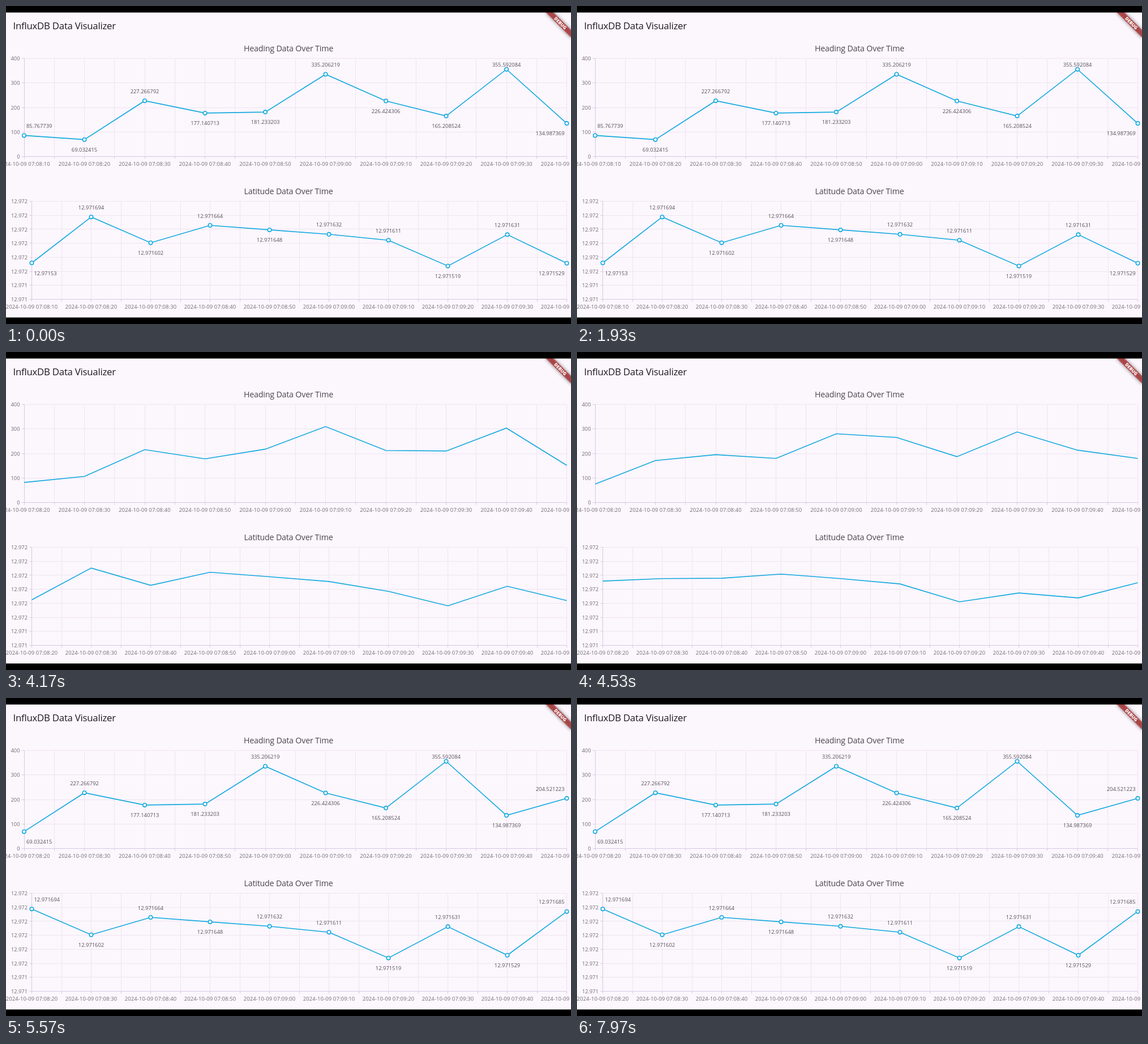
An HTML page with a canvas that plays this animation: 998x561 px, repeating every 8 s.

```html
<!DOCTYPE html>
<html lang="en">
<head>
<meta charset="utf-8">
<title>Data Visualizer</title>
<style>
  html, body { margin: 0; width: 100%; height: 100%; overflow: hidden; background: #000; }
  canvas { display: block; width: 998px; height: 561px; }
</style>
</head>
<body>
<canvas id="stage" width="998" height="561"></canvas>
<script>
const ctx = document.getElementById('stage').getContext('2d');
const W = 998, H = 561, BAR = 11.5, LOOP = 8000, RIGHT = 990.5, COUNT = 10;
const SHIFT = 3890, GROW = 882, FADE_IN = 5125, FADE = 225;
const FONT = '"Open Sans", "Noto Sans", sans-serif';
const SURFACE = '#fcf6fd', GRID = '#efe5f1', AXIS = '#d6c9e2', SERIES = '#14aadd';

const charts = [
  {
    title: 'Heading Data Over Time', titleY: 80, start: 3963,
    left: 32, top: 92.5, bottom: 265.5, min: 0, max: 400,
    ticks: ['400', '300', '200', '100', '0'],
    data: [85.767739, 69.032415, 227.266792, 177.140713, 181.233203, 335.206219,
           226.424306, 165.208524, 355.592084, 134.987369, 204.521223],
    format: String
  },
  {
    // values are millionths of a degree above 12.971
    title: 'Latitude Data Over Time', titleY: 332, start: 3997,
    left: 45.5, top: 344.5, bottom: 517.5, min: 400, max: 750,
    ticks: Array.from({ length: 8 }, (_, i) => i < 6 ? '12.972' : '12.971'),
    data: [530, 694, 602, 664, 648, 632, 611, 519, 631, 529, 685],
    format: u => String(+(12.971 + u / 1e6).toFixed(6))
  }
];

const clamp01 = v => Math.max(0, Math.min(1, v));
const crisp = v => Math.floor(v) + 0.5;

function text(str, x, y, size, color, align = 'left', spacing = 0, weight = 400) {
  ctx.font = `${weight} ${size}px ${FONT}`;
  ctx.letterSpacing = spacing + 'px';
  ctx.textAlign = align;
  ctx.fillStyle = color;
  ctx.fillText(str, x, y);
}

function line(x1, y1, x2, y2, color) {
  ctx.strokeStyle = color;
  ctx.lineWidth = 1;
  ctx.beginPath();
  ctx.moveTo(x1, y1);
  ctx.lineTo(x2, y2);
  ctx.stroke();
}

function stamp(i) {
  const s = 490 + i * 10;
  const pad = n => String(n).padStart(2, '0');
  return `2024-10-09 07:${pad(Math.floor(s / 60))}:${pad(s % 60)}`;
}

function drawAxes(c, first) {
  const step = (RIGHT - c.left) / (COUNT - 1);
  const rows = c.ticks.length - 1;
  for (let i = 1; i <= 2 * (COUNT - 1); i++) {
    const x = crisp(c.left + i * step / 2);
    line(x, c.top, x, c.bottom, GRID);
    line(x, c.bottom, x, c.bottom + 4, AXIS);
  }
  c.ticks.forEach((label, i) => {
    const y = c.top + (c.bottom - c.top) * i / rows;
    line(c.left, crisp(y), RIGHT, crisp(y), GRID);
    line(c.left - 4, crisp(y), c.left, crisp(y), AXIS);
    text(label, c.left - 7.5, y + 3.7, 9.3, '#716b76', 'right');
  });
  const ax = crisp(c.left);
  line(ax, c.top, ax, c.bottom + 4, AXIS);
  line(c.left, crisp(c.bottom), RIGHT, crisp(c.bottom), AXIS);
  for (let i = 0; i < COUNT; i++) {
    text(stamp(first + i), c.left + i * step, c.bottom + 16.7, 9.4, '#716b76', 'center', 0.17);
  }
}

// A label goes below when its point lies under the line joining its neighbours.
function isBelow(v, i) {
  if (i === 0) return v[1] > v[0];
  if (i === COUNT - 1) return v[i - 1] > v[i];
  return (v[i - 1] + v[i + 1]) / 2 >= v[i];
}

function drawMarks(c, points, values) {
  points.forEach(([x, y], i) => {
    ctx.beginPath();
    ctx.arc(x, y, 3.2, 0, Math.PI * 2);
    ctx.fillStyle = '#fff';
    ctx.fill();
    ctx.strokeStyle = SERIES;
    ctx.lineWidth = 1.6;
    ctx.stroke();

    const mid = isBelow(values, i) ? y + 17.8 : Math.max(y - 17, c.top + 11);
    const last = i === COUNT - 1;
    const align = i === 0 ? 'left' : last ? 'right' : 'center';
    const lx = i === 0 ? x + 4 : last ? x - 4 : x;
    text(c.format(values[i]), lx, mid + 3.5, 9.4, '#57515c', align);
  });
}

function drawChart(c, t) {
  const first = t >= SHIFT ? 1 : 0;
  const k = clamp01((t - c.start) / GROW);
  const step = (RIGHT - c.left) / (COUNT - 1);
  const toY = v => c.bottom - (v - c.min) / (c.max - c.min) * (c.bottom - c.top);

  drawAxes(c, first);
  text(c.title, 499, c.titleY, 14.2, '#49454f', 'center', -0.17);

  const points = Array.from({ length: COUNT }, (_, i) =>
    [c.left + i * step, toY(c.data[i] + (c.data[i + 1] - c.data[i]) * k)]);
  ctx.beginPath();
  points.forEach(([x, y]) => ctx.lineTo(x, y));
  ctx.strokeStyle = SERIES;
  ctx.lineWidth = 1.6;
  ctx.stroke();

  ctx.globalAlpha = first ? clamp01((t - FADE_IN) / FADE) : 1;
  if (ctx.globalAlpha > 0) drawMarks(c, points, c.data.slice(first, first + COUNT));
  ctx.globalAlpha = 1;
}

function drawBanner() {
  ctx.save();
  ctx.translate(W, BAR);
  ctx.rotate(Math.PI / 4);
  ctx.filter = 'blur(3px)';
  ctx.fillStyle = 'rgba(0, 0, 0, 0.5)';
  ctx.fillRect(-32, 21.8, 64, 9.4);
  ctx.filter = 'none';
  ctx.fillStyle = 'rgba(183, 28, 28, 0.63)';
  ctx.fillRect(-32, 21.8, 64, 9.4);
  text('DEBUG', 0, 29.4, 8, '#fff', 'center', 0, 800);
  ctx.restore();
}

function draw(t) {
  ctx.fillStyle = SURFACE;
  ctx.fillRect(0, 0, W, H);
  text('InfluxDB Data Visualizer', 12.5, 40.5, 16.8, '#1d1b20', 'left', -0.24);
  charts.forEach(c => drawChart(c, t));
  drawBanner();
  ctx.fillStyle = '#000';
  ctx.fillRect(0, 0, W, BAR);
  ctx.fillRect(0, H - BAR, W, BAR);
}

const begin = performance.now();
function tick() {
  draw((performance.now() - begin) % LOOP);
  requestAnimationFrame(tick);
}
tick();
</script>
</body>
</html>
```
